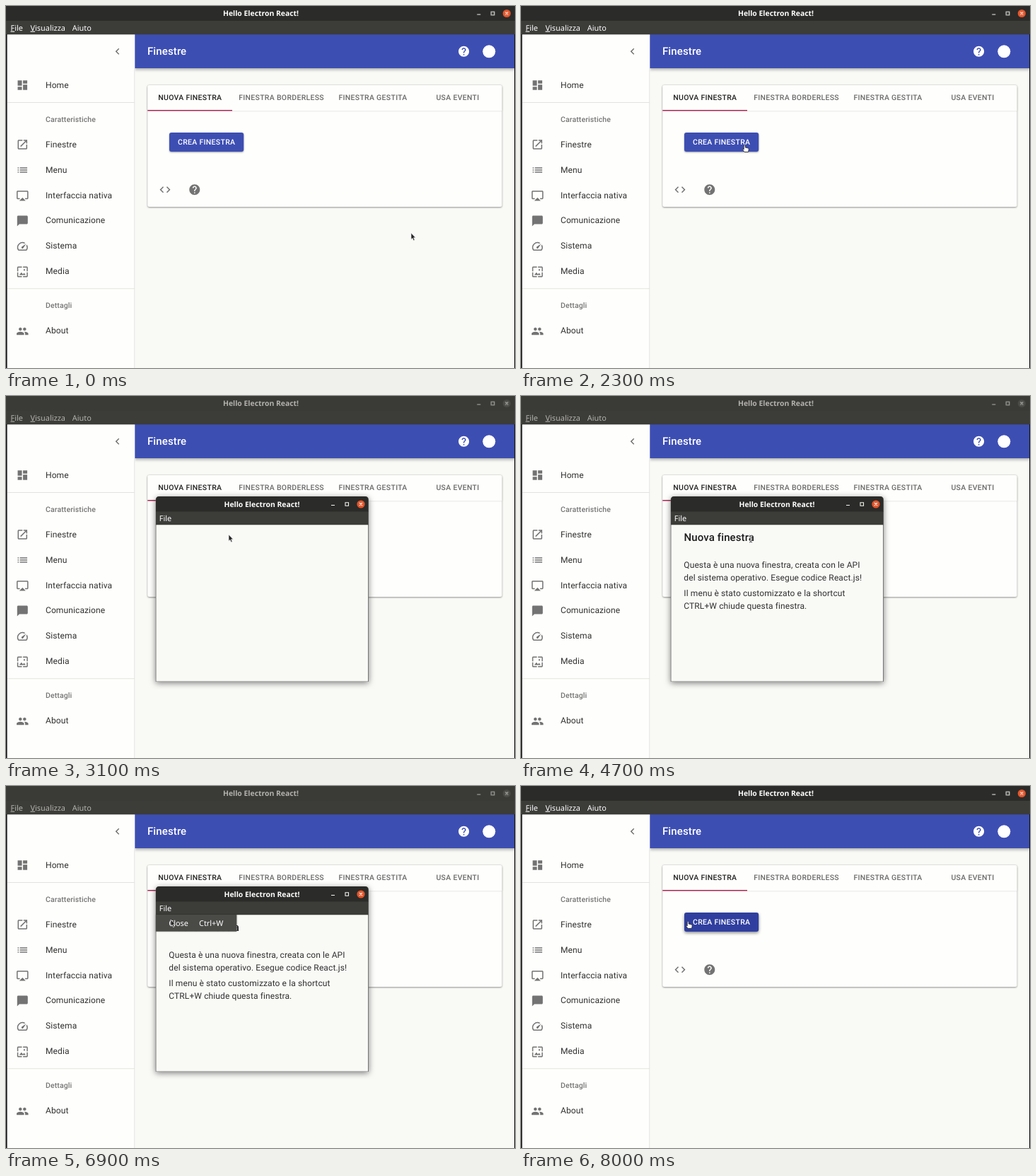
These frames come from a looping animation (720x512 px, 8200 ms). An HTML page:

```html
<!DOCTYPE html>
<html lang="it">
<head>
<meta charset="utf-8">
<title>Hello Electron React!</title>
<style>
html, body { margin: 0; width: 100%; height: 100%; overflow: hidden; background: #f9faf6; }
svg { display: block; width: 720px; height: 512px; font-family: Roboto, sans-serif; text-rendering: geometricPrecision; }

/* Typography */
.title { font: 700 10.4px "Noto Sans", sans-serif; text-anchor: middle; }
.menu { font: 500 10.9px "Noto Sans", sans-serif; }
.key { text-decoration: underline; }
.body { font-size: 12px; letter-spacing: .11px; fill: #303030; }
.head { font-size: 15px; font-weight: 500; letter-spacing: .11px; }
.sub { font-size: 10.5px; font-weight: 500; letter-spacing: .11px; fill: #757575; }
.caps { font-size: 10.5px; font-weight: 500; letter-spacing: .3px; text-anchor: middle; }

/* Surfaces */
.paper { fill: #fefffc; }
.icon { fill: #737373; }
.bar { fill: #3d4eb3; filter: drop-shadow(0 2px 2px rgba(0,0,0,.32)); }
.card { filter: drop-shadow(0 1px 1.2px rgba(0,0,0,.42)); }
.tabs { filter: drop-shadow(0 .8px .8px rgba(0,0,0,.2)); }
.rule { fill: #e2e3e0; }

/* One shared 8.2 s timeline */
.caption, .label, .close, .controls, .button, .window, .content, .dropdown, .item, .file,
.cursor, .arrow, .hand, .beam { animation: 8.2s step-end infinite; }

/* The main window loses focus while the child is open */
.caption { fill: #2b2b29; animation-name: caption; }
@keyframes caption { 35.36% { fill: #3a3a37; } 95.12% { fill: #2b2b29; } }
.label { fill: #fff; animation-name: label; }
@keyframes label { 35.36% { fill: #b3b2ad; } 95.12% { fill: #fff; } }
.close { fill: #e4552a; animation-name: close; }
@keyframes close { 35.36% { fill: #4a4a46; } 95.12% { fill: #e4552a; } }
.controls { animation-name: controls; }
@keyframes controls { 35.36% { opacity: .65; } 95.12% { opacity: 1; } }

.button { fill: #3d4eb3; filter: drop-shadow(0 1.4px 1.2px rgba(0,0,0,.4)); animation-name: button; }
@keyframes button {
  30.48% { fill: #3646a8; }
  31.70% { fill: #303f9f; }
  37.80% { fill: #3d4eb3; }
  96.34% { fill: #3646a8; }
  97.56% { fill: #303f9f; filter: drop-shadow(0 2px 2px rgba(0,0,0,.45)); }
}

.window { opacity: 0; transform-origin: 362px 273px; animation-name: window; }
@keyframes window {
  35.36% { opacity: .5; transform: scale(.95); }
  36.58% { opacity: .9; transform: scale(.99); }
  37.80% { opacity: 1; transform: none; }
  95.12% { opacity: .6; transform: scale(.98); }
  96.34% { opacity: .2; transform: scale(.95); }
  97.56% { opacity: 0; transform: none; }
}
.frame { filter: drop-shadow(0 2px 4px rgba(0,0,0,.5)); }

.content { visibility: hidden; animation-name: content; }
@keyframes content { 48.78% { visibility: visible; } 97.56% { visibility: hidden; } }
.dropdown { visibility: hidden; animation-name: dropdown; }
@keyframes dropdown { 67.07% { visibility: visible; } 93.90% { visibility: hidden; } }
.item { fill: #373735; filter: drop-shadow(0 .5px 1px rgba(0,0,0,.35)); animation-name: item; }
@keyframes item { 82.92% { fill: #4a4a47; } 93.90% { fill: #373735; } }
.file { visibility: hidden; animation-name: file; }
@keyframes file { 93.90% { visibility: visible; } 97.56% { visibility: hidden; } }

.cursor { transform: translate(573px, 321px); animation-name: path; }
@keyframes path {
  19.51% { transform: translate(565px, 317px); }
  20.73% { transform: translate(542px, 306px); }
  21.95% { transform: translate(496px, 283px); }
  23.17% { transform: translate(439px, 256px); }
  24.39% { transform: translate(385px, 229px); }
  25.60% { transform: translate(346px, 211px); }
  26.82% { transform: translate(325px, 201px); }
  28.04% { transform: translate(315px, 196px); }
  53.65% { transform: translate(317px, 197px); }
  54.87% { transform: translate(321px, 199px); }
  56.09% { transform: translate(324px, 201px); }
  57.31% { transform: translate(325px, 202px); }
  59.75% { transform: translate(318px, 199px); }
  60.97% { transform: translate(295px, 193px); }
  62.19% { transform: translate(262px, 184px); }
  63.41% { transform: translate(236px, 178px); }
  64.63% { transform: translate(224px, 176px); }
  79.26% { transform: translate(225px, 177px); }
  80.48% { transform: translate(226px, 179px); }
  81.70% { transform: translate(228px, 182px); }
  82.92% { transform: translate(231px, 186px); }
  84.14% { transform: translate(233px, 189px); }
  85.36% { transform: translate(234px, 190px); }
  86.58%, 100% { transform: translate(235px, 191px); }
}
.arrow { animation-name: arrow; }
@keyframes arrow {
  26.82% { visibility: hidden; } 36.58% { visibility: visible; }
  48.78% { visibility: hidden; } 60.97% { visibility: visible; }
  96.34%, 100% { visibility: hidden; }
}
.hand { visibility: hidden; animation-name: hand; }
@keyframes hand {
  26.82% { visibility: visible; } 36.58% { visibility: hidden; }
  96.34%, 100% { visibility: visible; }
}
.beam { visibility: hidden; animation-name: beam; }
@keyframes beam { 48.78% { visibility: visible; } 60.97% { visibility: hidden; } }
</style>
</head>
<body>
<svg viewBox="0 0 720 512">
  <defs>
    <path id="help" d="M12 2C6.48 2 2 6.48 2 12s4.48 10 10 10 10-4.48 10-10S17.52 2 12 2zm1 17h-2v-2h2v2zm2.07-7.75l-.9.92C13.45 12.9 13 13.5 13 15h-2v-.5c0-1.1.45-2.1 1.17-2.83l1.24-1.26c.37-.36.59-.86.59-1.41 0-1.1-.9-2-2-2s-2 .9-2 2H8c0-2.21 1.79-4 4-4s4 1.79 4 4c0 .88-.36 1.68-.93 2.25z"/>
    <!-- Minimise, maximise and close, centred on the close button -->
    <path id="controls" d="M-42 1.5h5M-22 -2.2h4.5v4.5h-4.5zM-2 -2l4 4M2 -2l-4 4" fill="none" stroke="#f4f3f0" stroke-width="1.1"/>
    <path id="bar" d="M-2 -5q2 0 2 1.5v7q0 1.5-2 1.5M2 -5q-2 0-2 1.5M2 5q-2 0-2-1.5" fill="none"/>
  </defs>

  <!-- Main window -->
  <rect width="720" height="512" fill="#f9faf6"/>
  <rect class="bar" x="182" y="40" width="538" height="48"/>
  <rect class="paper" y="40" width="182.3" height="472"/>
  <rect class="rule" x="181.3" y="88" width="1" height="424"/>
  <rect class="caption" width="720" height="21.5"/>
  <rect y="21" width="720" height="19.3" fill="#3c3c39"/>
  <path d="M0 40h1.6v472H0zM719 40h1v472h-1z" fill="#111"/>
  <g class="label">
    <text class="title" x="360.5" y="14.3">Hello Electron React!</text>
    <g class="menu">
      <text x="6.5" y="34.6"><tspan class="key">F</tspan>ile</text>
      <text x="34.5" y="34.6"><tspan class="key">V</tspan>isualizza</text>
      <text x="93.8" y="34.6">Aiuto</text>
    </g>
  </g>
  <circle class="close" cx="708.3" cy="10.5" r="5.6"/>
  <use class="controls" href="#controls" x="708.3" y="10.5"/>

  <!-- Sidebar -->
  <path class="icon" transform="translate(148.7 55.3) scale(.75)" d="M15.41 7.41L14 6l-6 6 6 6 1.41-1.41L10.83 12z"/>
  <g class="icon" transform="translate(14.3 0) scale(.75)">
    <path transform="translate(0 137.3)" d="M3 13h8V3H3v10zm0 8h8v-6H3v6zm10 0h8V11h-8v10zm0-18v6h8V3h-8z"/>
    <path transform="translate(0 249.3)" d="M19 19H5V5h7V3H5c-1.11 0-2 .9-2 2v14c0 1.1.89 2 2 2h14c1.1 0 2-.9 2-2v-7h-2v7zM14 3v2h3.59l-9.83 9.83 1.41 1.41L19 6.41V10h2V3h-7z"/>
    <path transform="translate(0 297.3)" d="M3 13h2v-2H3v2zm0 4h2v-2H3v2zm0-8h2V7H3v2zm4 4h14v-2H7v2zm0 4h14v-2H7v2zM7 7v2h14V7H7z"/>
    <path transform="translate(0 345.3)" d="M6 22h12l-6-6zM21 3H3c-1.1 0-2 .9-2 2v12c0 1.1.9 2 2 2h4v-2H3V5h18v12h-4v2h4c1.1 0 2-.9 2-2V5c0-1.1-.9-2-2-2z"/>
    <path transform="translate(0 393.3)" d="M20 2H4c-1.1 0-2 .9-2 2v18l4-4h14c1.1 0 2-.9 2-2V4c0-1.1-.9-2-2-2z"/>
    <path transform="translate(0 441.3)" d="M20.38 8.57l-1.23 1.85a8 8 0 0 1-.22 7.58H5.07A8 8 0 0 1 15.58 6.85l1.85-1.23A10 10 0 0 0 3.35 19a2 2 0 0 0 1.72 1h13.85a2 2 0 0 0 1.74-1 10 10 0 0 0-.27-10.44zm-9.79 6.84a2 2 0 0 0 2.83 0l5.66-8.49-8.49 5.66a2 2 0 0 0 0 2.83z"/>
    <path transform="translate(0 489.3)" d="M4 4h7V2H4c-1.1 0-2 .9-2 2v7h2V4zm6 9l-4 5h12l-3-4-2.03 2.71L10 13zm7-4.5c0-.83-.67-1.5-1.5-1.5S14 7.67 14 8.5s.67 1.5 1.5 1.5S17 9.33 17 8.5zM20 2h-7v2h7v7h2V4c0-1.1-.9-2-2-2zm0 18h-7v2h7c1.1 0 2-.9 2-2v-7h-2v7zM4 13H2v7c0 1.1.9 2 2 2h7v-2H4v-7z"/>
    <path transform="translate(0 601.3)" d="M16 11c1.66 0 2.99-1.34 2.99-3S17.66 5 16 5c-1.66 0-3 1.34-3 3s1.34 3 3 3zm-8 0c1.66 0 2.99-1.34 2.99-3S9.66 5 8 5C6.34 5 5 6.34 5 8s1.34 3 3 3zm0 2c-2.33 0-7 1.17-7 3.5V19h14v-2.5c0-2.33-4.67-3.5-7-3.5zm8 0c-.29 0-.62.02-.97.05 1.16.84 1.97 1.97 1.97 3.45V19h6v-2.5c0-2.33-4.67-3.5-7-3.5z"/>
  </g>
  <path class="rule" d="M2 136h180v1H2zM2 399.3h180v1H2z"/>
  <g class="body">
    <text x="56" y="115.5">Home</text>
    <text x="56" y="199.6">Finestre</text>
    <text x="56" y="235.6">Menu</text>
    <text x="56" y="271.6">Interfaccia nativa</text>
    <text x="56" y="307.4">Comunicazione</text>
    <text x="56" y="343.2">Sistema</text>
    <text x="56" y="379">Media</text>
    <text x="56" y="463.2">About</text>
  </g>
  <g class="sub">
    <text x="56" y="163.8">Caratteristiche</text>
    <text x="56" y="427.3">Dettagli</text>
  </g>

  <!-- App bar -->
  <text class="head" x="200" y="69" fill="#fff">Finestre</text>
  <use href="#help" transform="translate(638.6 55.2) scale(.75)" fill="#fff"/>
  <circle cx="683.3" cy="64.3" r="9" fill="#fff"/>

  <!-- Card -->
  <rect class="paper card" x="200.3" y="112" width="501.2" height="172" rx="2.5"/>
  <path class="paper tabs" d="M200.3 148.3V114.5q0-2.5 2.5-2.5H699q2.5 0 2.5 2.5v33.8z"/>
  <rect x="200.3" y="147" width="119.7" height="1.4" fill="#ac1c4f"/>
  <g class="caps" fill="#6b6b6b">
    <text x="260.3" y="133.2" fill="#222">NUOVA FINESTRA</text>
    <text x="389.6" y="133.2">FINESTRA BORDERLESS</text>
    <text x="519" y="133.2">FINESTRA GESTITA</text>
    <text x="639" y="133.2">USA EVENTI</text>
  </g>
  <rect class="button" x="231" y="179" width="105.2" height="27" rx="3"/>
  <text class="caps" x="283.7" y="195.6" fill="#fff">CREA FINESTRA</text>
  <g class="icon">
    <path transform="translate(216 250.7) scale(.75)" d="M9.4 16.6L4.8 12l4.6-4.6L8 6l-6 6 6 6 1.4-1.4zm5.2 0l4.6-4.6-4.6-4.6L16 6l6 6-6 6-1.4-1.4z"/>
    <use href="#help" transform="translate(257.8 250.7) scale(.75)"/>
  </g>

  <!-- Child window -->
  <g class="window">
    <path class="frame" d="M211.7 404V147q0-5 5-5H508q5 0 5 5v257z" fill="#777"/>
    <path d="M212 164v-17q0-5 5-5h290.5q5 0 5 5v17z" fill="#2b2b29"/>
    <rect x="212" y="163.5" width="300.5" height="19" fill="#3c3c39"/>
    <rect x="212.5" y="182.3" width="299.5" height="221.2" fill="#f9faf6"/>
    <rect class="file" x="212" y="164" width="28" height="18.3" fill="#4b4b48"/>
    <text class="title" x="362" y="156.8" fill="#fff">Hello Electron React!</text>
    <text class="menu" x="216.8" y="177" fill="#fff">File</text>
    <circle cx="502" cy="153" r="5.6" fill="#e4552a"/>
    <use href="#controls" x="502" y="153"/>
    <g class="content">
      <text class="head" x="230.5" y="204.8" fill="#1c1c1c">Nuova finestra</text>
      <g class="body">
        <text x="230.3" y="242.8">Questa è una nuova finestra, creata con le API</text>
        <text x="230.3" y="260.8">del sistema operativo. Esegue codice React.js!</text>
        <text x="230.3" y="282.8">Il menu è stato customizzato e la shortcut</text>
        <text x="230.3" y="300.6">CTRL+W chiude questa finestra.</text>
      </g>
    </g>
    <g class="dropdown">
      <rect class="item" x="212" y="182" width="114.3" height="23.7"/>
      <g class="menu" fill="#fff">
        <text x="230.3" y="197.8">Close</text>
        <text x="273" y="197.8">Ctrl+W</text>
      </g>
    </g>
  </g>

  <!-- Pointer, drawn from its hot spot -->
  <g class="cursor" stroke-linejoin="round">
    <path class="arrow" d="M0 0v9.2l2-1.8 1.5 3.3 1.6-.7L3.6 6.8h2.7z" fill="#222" stroke="#eee" stroke-width=".7"/>
    <path class="hand" d="M.2 7V1q1-1.6 2 0v3l4 1q1.3.4 1 2L6.5 10.5H1.2L-1.8 6.8q.4-1.3 2 .2z" fill="#fff" stroke="#222" stroke-width=".8"/>
    <g class="beam">
      <use href="#bar" stroke="#fff" stroke-width="2"/>
      <use href="#bar" stroke="#333" stroke-width=".9"/>
    </g>
  </g>
</svg>
</body>
</html>
```
